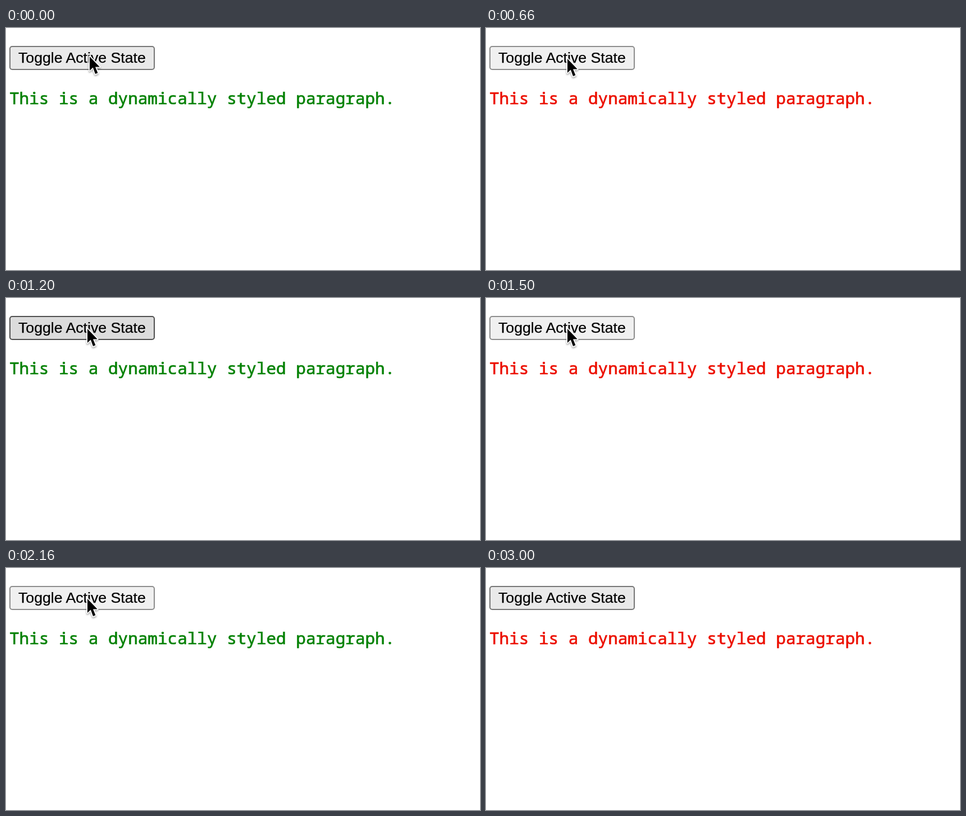
An HTML page for the animation above (3060 ms loop, 844 px wide and 432 px high).

```html
<!DOCTYPE html>
<html lang="en">
<head>
<meta charset="utf-8">
<title>Toggle Active State</title>
<style>
  html, body { margin: 0; width: 100%; height: 100%; overflow: hidden; background: #fff; }
  svg { display: block; width: 844px; height: 432px; }
  #box { fill: #e9e9e9; stroke: #767676; stroke-width: 2; }
  #box.hover { fill: #dcdcdc; stroke: #4f4f4f; }
  #box.active { fill: #f0f0f0; stroke: #8d8d8d; }
  #label { font: 26.67px "Liberation Sans", Arial, sans-serif; font-kerning: normal; stroke: #000; stroke-width: .25; }
  #para { font: 29.33px "Noto Sans Mono", monospace; fill: #058205; stroke: #058205; stroke-width: .7; }
  #para.on { fill: #ec1000; stroke: #ec1000; }
  #cursor { filter: drop-shadow(0 2px 1.5px rgba(0, 0, 0, .35)); }
  #cursor path { stroke: #fff; stroke-width: 3.6; stroke-linejoin: round; paint-order: stroke; }
</style>
</head>
<body>
<svg viewBox="0 0 844 432">
  <rect id="box" x="7" y="33" width="257" height="41" rx="4"/>
  <text id="label" x="22" y="62">Toggle Active State</text>
  <text id="para" x="6" y="136.3">This is a dynamically styled paragraph.</text>
  <g id="cursor"><path d="M0 0V25L5.8 19.6L10 31L14.4 29.2L10 18.4H17.8Z"/></g>
</svg>
<script>
  const LOOP = 3060, STEP = 60;
  const HOVER = 300, LEAVE = 2460, GONE = 2940;
  const clicks = [540, 720, 960, 1140, 1380, 1560, 1800, 1980, 2220];
  const [box, para, cursor] = ['box', 'para', 'cursor'].map(id => document.getElementById(id));

  function pointer(t) {
    if (t < STEP) return [149, 51];
    if (t < LEAVE) return [145, 55];
    const u = (t - LEAVE) / 420;
    return [146 + 50 * u * u, 55 + 316 * u ** 2.5];
  }

  function draw(now) {
    const t = Math.floor((now % LOOP) / STEP) * STEP;
    const [x, y] = pointer(t);
    const inside = t >= HOVER && y < 75;
    const pressed = clicks.some(c => t >= c - STEP && t < c);
    const count = clicks.filter(c => t >= c).length;

    box.setAttribute('class', pressed ? 'active' : inside ? 'hover' : '');
    para.setAttribute('class', count % 2 ? 'on' : '');
    cursor.setAttribute('transform', `translate(${x} ${y})`);
    cursor.setAttribute('visibility', t < GONE ? 'visible' : 'hidden');
  }

  const start = performance.now();
  function tick() {
    draw(performance.now() - start);
    requestAnimationFrame(tick);
  }
  tick();
</script>
</body>
</html>
```
